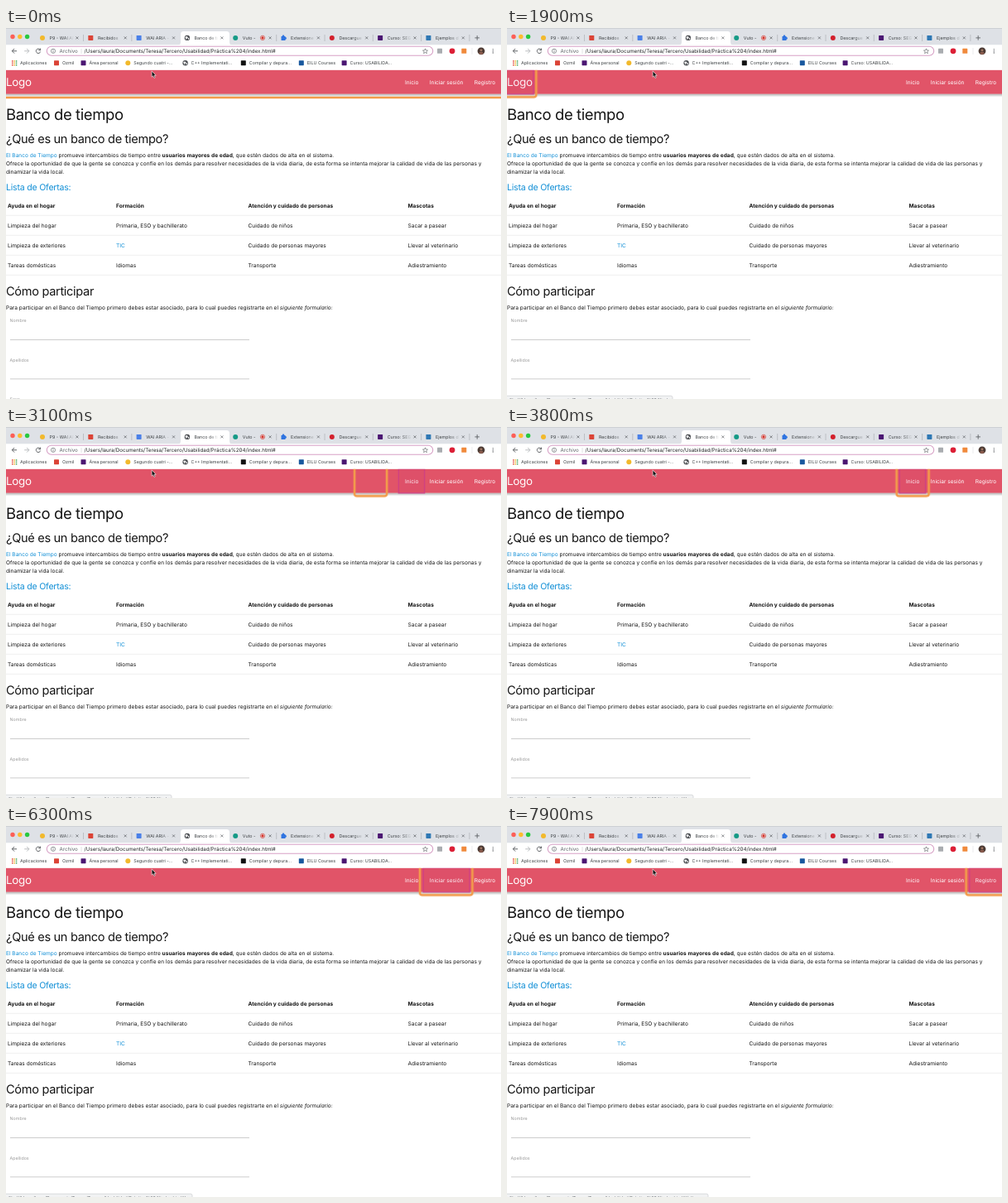
An HTML page that plays this animation: 598 px wide and 448 px high, repeating every 8 s.

```html
<!DOCTYPE html>
<html lang="es">
<head>
<meta charset="utf-8">
<title>Banco de tiempo</title>
<style>
html, body { margin: 0; width: 100%; height: 100%; overflow: hidden; background: #fff; }
svg { display: block; width: 100vw; height: 100vh; }
text { font: 6.55px Inter, "Open Sans", sans-serif; fill: #151515; text-rendering: geometricPrecision; white-space: pre; }
.b { font-weight: 700; }
tspan.b { letter-spacing: .008em; }
.i { font-style: italic; }
.a { fill: #128fd6; }
.h1 { font-size: 18.55px; letter-spacing: -.022em; }
.h2 { font-size: 14.58px; letter-spacing: -.022em; }
.h3 { font-size: 10.55px; letter-spacing: -.02em; }
.logo { font-size: 13.4px; letter-spacing: -.02em; }
.w { fill: #fff; }
.label { font-size: 5.3px; fill: #9a9a9a; }
.ui { font-size: 5.35px; fill: #3c4043; }
.url { font-size: 6.2px; fill: #202124; }
.dim { fill: #5f6368; }
</style>
</head>
<body>
<svg id="stage" viewBox="0 0 598 448" xmlns="http://www.w3.org/2000/svg">
  <defs>
    <linearGradient id="shade" x2="0" y2="1">
      <stop offset="0" stop-color="#000" stop-opacity=".32"/>
      <stop offset="1" stop-color="#000" stop-opacity="0"/>
    </linearGradient>
    <linearGradient id="fade">
      <stop offset=".6" stop-color="#dee1e6" stop-opacity="0"/>
      <stop offset="1" stop-color="#dee1e6"/>
    </linearGradient>
    <linearGradient id="fadeOn">
      <stop offset=".6" stop-color="#fff" stop-opacity="0"/>
      <stop offset="1" stop-color="#fff"/>
    </linearGradient>
    <clipPath id="view"><rect y="50.6" width="598" height="398"/></clipPath>
    <g id="globe">
      <circle r="3.2" fill="#4a4d51"/>
      <path d="M-2.4-.9Q-.8-2 .3-1.2T-.6 .8T-1 2.2M1 .2Q2 0 2.3 .9L1.2 2Z" fill="#fff" stroke="#fff" stroke-width=".4"/>
    </g>
  </defs>
  <rect width="598" height="448" fill="#fff"/>
  <g id="page"></g>
  <g clip-path="url(#view)">
    <rect id="box" y="50.6" height="29.2" fill="#c02878" fill-opacity=".08" stroke="#cf3f86" stroke-width="1.4" stroke-opacity=".85"/>
    <g fill="none" stroke="#f29b4b">
      <rect class="ring" y="45" rx="3" stroke-width="4.2" stroke-opacity=".28"/>
      <rect class="ring" y="45" rx="3" stroke-width="2.2"/>
    </g>
  </g>
  <g id="status">
    <rect id="bar" x="-3" y="444.2" height="12" rx="2" fill="#f1f2f3" stroke="#c4c6c9" stroke-width=".6"/>
    <text id="hint" class="ui dim" x="3" y="450.6"></text>
  </g>
  <g id="chrome"></g>
  <path d="M176.1 51.9V59.2L177.7 57.8 178.9 60.4 180.2 59.8 179 57.3H181.2Z" fill="#111" stroke="#fff" stroke-width=".6"/>
</svg>
<script>
const $ = id => document.getElementById(id);
const text = (x, y, s, cls = "") => `<text x="${x}" y="${y}" class="${cls}">${s}</text>`;
const rect = (x, y, w, h, fill, rx = 0) => `<rect x="${x}" y="${y}" width="${w}" height="${h}" rx="${rx}" fill="${fill}"/>`;
const dot = (x, y, r, fill) => `<circle cx="${x}" cy="${y}" r="${r}" fill="${fill}"/>`;
const line = (d, color, w = .6) => `<path d="${d}" fill="none" stroke="${color}" stroke-width="${w}"/>`;
const square = (x, y, fill) => rect(x - 3, y - 3, 6, 6, fill, .6);
const globe = (x, y) => `<use href="#globe" x="${x}" y="${y}"/>`;
const disc = (x, y, fill) => dot(x, y, 3, fill);
const puzzle = (x, y, fill) => rect(x - 3, y - 1.9, 5, 5, fill, .5) + dot(x - .5, y - 2, 1.3, fill) + dot(x + 2, y + .5, 1.3, fill);

function drawPage() {
  const rows = [
    ["Ayuda en el hogar", "Formación", "Atención y cuidado de personas", "Mascotas"],
    ["Limpieza del hogar", "Primaria, ESO y bachillerato", "Cuidado de niños", "Sacar a pasear"],
    ["Limpieza de exteriores", "TIC", "Cuidado de personas mayores", "Llevar al veterinario"],
    ["Tareas domésticas", "Idiomas", "Transporte", "Adiestramiento"]
  ];
  const cols = [2, 133, 292.5, 485.5];
  const table = rows.map((row, r) =>
    row.map((s, c) => text(cols[c], 216.6 + 24 * r, s, r ? (s === "TIC" ? "a" : "") : "b")).join("") +
    line(`M0 ${226.3 + 24 * r}H598`, "#dcdcdc", .5)).join("");
  const field = (y, name) => text(4.6, y, name, "label") + line(`M5 ${y + 21.2}H294`, "#9a9a9a", .5);

  $("page").innerHTML =
    rect(0, 79.4, 598, 4, "url(#shade)") + rect(0, 50.6, 598, 29, "#e15468") +
    text(0, 70.2, "Logo", "logo w") +
    text(482, 67.8, "Inicio", "w") + text(511.8, 67.8, "Iniciar sesión", "w") + text(565.8, 67.8, "Registro", "w") +
    text(0, 110.9, "Banco de tiempo", "h1") +
    text(0, 138.8, "¿Qué es un banco de tiempo?", "h2") +
    text(0, 156.2, `<tspan class="a">El Banco de Tiempo</tspan> promueve intercambios de tiempo entre <tspan class="b">usuarios mayores de edad</tspan>, que estén dados de alta en el sistema.`) +
    text(0, 166.1, "Ofrece la oportunidad de que la gente se conozca y confíe en los demás para resolver necesidades de la vida diaria, de esta forma se intenta mejorar la calidad de vida de las personas y") +
    text(0, 176, "dinamizar la vida local.") +
    text(0, 195.8, "Lista de Ofertas:", "h3 a") + table +
    text(0, 322.7, "Cómo participar", "h2") +
    text(0, 339.9, `Para participar en el Banco del Tiempo primero debes estar asociado, para lo cual puedes registrarte en el <tspan class="i">siguiente formulario:</tspan>`) +
    field(355.3, "Nombre") + field(402.6, "Apellidos") + field(449.6, "Sexo");
}

function drawTabs() {
  const tabs = [
    ["P9 - WAI AR", disc, "#f2b92c"], ["Recibidos", square, "#db4437"], ["WAI ARIA -", square, "#4a80e8"],
    ["Banco de ti", globe], ["Vuto -", disc, "#159a86"], ["Extensione", puzzle, "#2f74e0"],
    ["Descargue", disc, "#d3202c"], ["Curso: SEG", square, "#4b1672"], ["Ejemplos d", square, "#2f78b4"]
  ];
  const lights = ["#fc5f57", "#fdbc2e", "#28c840"].map((c, i) => dot(8 + 8.8 * i, 10.5, 2.7, c)).join("");
  const active = `<path d="M207.5 20.5Q211 20.5 211 17V7.5Q211 4 214.5 4H266.5Q270 4 270 7.5V17Q270 20.5 273.5 20.5Z" fill="#fff"/>`;
  return rect(0, 0, 598, 20.5, "#dee1e6") + line("M0 .3H598", "#b9bcc0") + lights + active + tabs.map(([name, icon, color], i) => {
    const x = 44 + 58.3 * i, on = i === 3;
    const cross = `M${x + 40.4} 10.4l3 3m0-3l-3 3`;
    const gap = i === 2 || on ? "" : line(`M${x + 49.5} 8V16`, "#9a9da2", .5);
    const cover = rect(x + 8, 6, 30, 12, on ? "url(#fadeOn)" : "url(#fade)") + rect(x + 38, 6, 8, 12, on ? "#fff" : "#dee1e6");
    const rec = i === 4 ? `<circle cx="310" cy="11.9" r="2.7" fill="none" stroke="#d93025" stroke-width=".6"/>` + dot(310, 11.9, 1.6, "#d93025") : "";
    return icon(x, 11.9, color) + text(x + 8.6, 13.9, name, "ui") + cover + line(cross, "#505357", .65) + gap + rec;
  }).join("") + line("M566.4 11.9h5.6m-2.8-2.8v5.6", "#505357", .8);
}

function drawToolbar() {
  const star = Array.from({ length: 10 }, (_, i) => {
    const r = i % 2 ? 1.4 : 3.2, a = i * Math.PI / 5;
    return `${506.5 + r * Math.sin(a)},${28.1 - r * Math.cos(a)}`;
  }).join(" ");
  const dots = [0, 1, 2].map(i => dot(588.3, 25.8 + 2.1 * i, .65, "#55585c")).join("");
  return rect(0, 20.5, 598, 30.1, "#fff") +
    line("M13 27.8H7.4M10.1 25l-2.8 2.8 2.8 2.8", "#505357", .9) +
    line("M22.2 27.8h5.6M25.1 25l2.8 2.8-2.8 2.8", "#b4b6b9", .9) +
    line("M41 26A2.7 2.7 0 1 0 41.6 28.6M41.6 24.6V26.9H39.3", "#505357", .9) +
    `<rect x="49.3" y="22.3" width="466.4" height="11" rx="5.5" fill="#fff" stroke="#d7a1c6" stroke-width="1.1"/>` +
    `<circle cx="57" cy="27.8" r="2.6" fill="none" stroke="#5f6368" stroke-width=".65"/>` +
    line("M57 27.4V29.3M57 26.1V26.8", "#5f6368", .7) +
    text(64.5, 30, "Archivo", "url dim") + line("M91 25V31", "#c0c2c5", .5) +
    text(94.6, 30, "/Users/laura/Documents/Teresa/Tercero/Usabilidad/Práctica%204/index.html#", "url") +
    `<polygon points="${star}" fill="none" stroke="#55585c" stroke-width=".6"/>` +
    square(524, 27.8, "#a9acb0") + dot(539, 27.8, 3.4, "#dc1f36") + square(553.3, 27.8, "#f08a3c") +
    line("M563 24V32", "#d4d6d9", .5) +
    dot(574, 27.8, 4.4, "#4b3a34") + dot(574, 26.8, 1.4, "#a47b66") + `<path d="M571.3 31Q571.6 28.5 574 28.5T576.7 31Q574 32.8 571.3 31Z" fill="#8a5b4c"/>` + dots;
}

function drawBookmarks() {
  const marks = [
    [61, "Ozmil", square, "#db4437"], [93.5, "Área personal", square, "#4b1672"],
    [147.3, "Segundo cuatri -...", disc, "#f2b92c"], [216.6, "C++ Implementati...", globe],
    [286.8, "Compilar y depura...", square, "#111"], [356.8, "EILU Courses", square, "#19589e"],
    [408.6, "Curso: USABILIDA...", square, "#4b1672"]
  ];
  const hues = ["#e2453a", "#f2b42d", "#3fa35a", "#4a80e8"];
  let grid = "";
  for (let i = 0; i < 9; i++) grid += rect(7 + i % 3 * 2.4, 39.2 + (i / 3 | 0) * 2.4, 1.5, 1.5, hues[(i + (i / 3 | 0)) % 4]);
  return grid + text(17, 44.2, "Aplicaciones", "ui") +
    marks.map(([x, name, icon, color]) => icon(x, 42.2, color) + text(x + 7, 44.2, name, "ui")).join("");
}

// Focus stops: start time, ring edges, link edges.
const LOOP = 8000, MOVE = 480;
const stops = [
  { at: -MOVE, ring: [-5, 603] },
  { at: 874, ring: [-5, 35.3], box: [-2, 32] },
  { at: 2847, ring: [470.7, 509.6], box: [474.3, 505.6] },
  { at: 5910, ring: [500.2, 563.8], box: [504.2, 560] },
  { at: 7480, ring: [554.8, 603], box: [558.8, 602] }
];
const bars = [[1800, 200], [3600, 225], [6700, 243]];
const file = "file:///Users/laura/Documents/Teresa/Tercero/Usabilidad/Práctica%204/index.html";
const hints = { 200: file.slice(0, -5), 225: file + "#!", 243: file + "#!/alta" };
const rings = document.querySelectorAll(".ring");
const easeOut = u => 1 - (1 - u) ** 3;

function span(el, [l, r]) {
  el.setAttribute("x", l);
  el.setAttribute("width", r - l);
}

function render(t) {
  const n = stops.findLastIndex(s => t >= s.at);
  const now = stops[n], from = stops[Math.max(0, n - 1)];
  const k = easeOut(Math.min(1, (t - now.at) / MOVE));
  const edges = now.ring.map((v, i) => from.ring[i] + (v - from.ring[i]) * k);
  rings.forEach(el => {
    span(el, edges);
    el.setAttribute("height", n ? 38.4 : 39);
  });
  $("box").style.display = now.box ? "" : "none";
  if (now.box) span($("box"), now.box);

  const bar = bars.findLast(b => t >= b[0]);
  $("status").style.display = bar ? "" : "none";
  if (bar) {
    $("bar").setAttribute("width", bar[1] + 3);
    $("hint").textContent = hints[bar[1]];
  }
}

drawPage();
$("chrome").innerHTML = drawTabs() + drawToolbar() + drawBookmarks();
const start = performance.now();
function tick() {
  render((performance.now() - start) % LOOP);
  requestAnimationFrame(tick);
}
tick();
</script>
</body>
</html>
```
